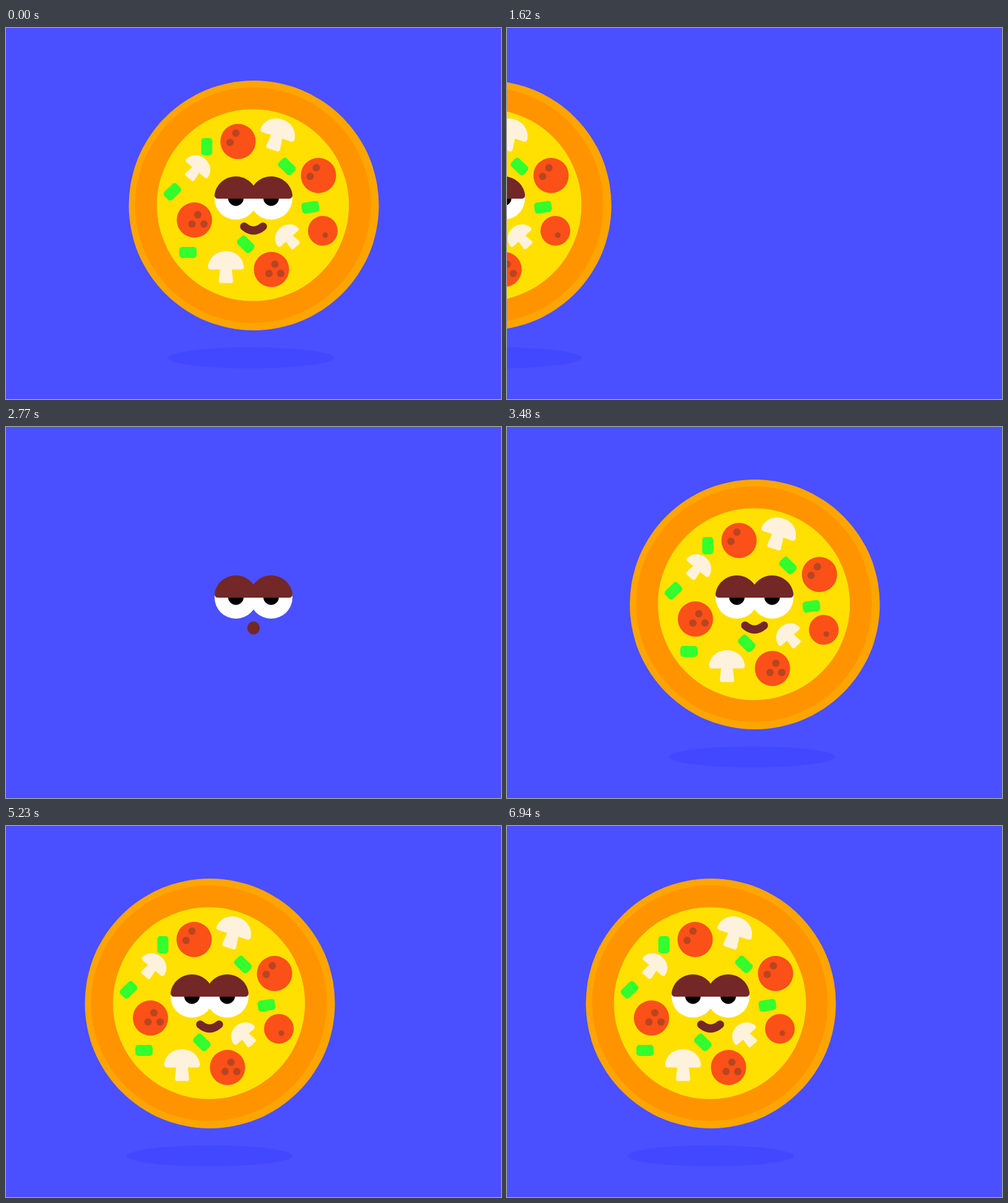
Recreate the animation shown at these times as an HTML page. Size 800 by 600 pixels, loop 6.97 s.

```html
<!DOCTYPE html>
<html lang="en">
<head>
<meta charset="utf-8">
<title>Pizza</title>
<style>
  html, body { margin: 0; width: 100%; height: 100%; overflow: hidden; background: #4a50ff; }
  svg { display: block; width: 800px; height: 600px; }
</style>
</head>
<body>
<svg viewBox="0 0 800 600">
  <defs>
    <clipPath id="cut"></clipPath>
    <clipPath id="disc"><circle cx="400.5" cy="287" r="202"/></clipPath>
    <g id="mushroom">
      <path d="M-24 0Q-29 0-29-5C-27-20-15-29.500 0-29.500S27-20 29-5Q29 0 24 0H9.500L11.500 18Q11.500 22 8 22H-8Q-11.500 22-11.500 18L-9.500 0Z"/>
    </g>
  </defs>
  <ellipse id="shadow" cx="396" cy="533.5" rx="134.500" ry="17" fill="#4248ff"/>
  <g id="pizza">
    <g clip-path="url(#cut)">
      <circle cx="399" cy="286.500" r="160" fill="#ffe000"/>
      <g id="toppings"></g>
    </g>
    <g id="crust" clip-path="url(#disc)"></g>
    <g id="face">
      <g fill="#fff"><circle cx="371.500" cy="275.500" r="34.500"/><circle cx="428.500" cy="275.500" r="34.500"/></g>
      <circle cx="371.500" cy="275.200" r="12.500"/><circle cx="428.500" cy="275.200" r="12.500"/>
      <path fill="#732727" d="M343 276Q337 276 337 270A34.700 34.700 0 0 1 400 255A34.700 34.700 0 0 1 463 270Q463 276 457 276Z"/>
      <path id="smile" d="M384.800 321Q400 334 415.300 321" fill="none" stroke="#732727" stroke-width="13" stroke-linecap="round"/>
      <ellipse id="gasp" cx="400" cy="325" rx="10" ry="10.500" fill="#732727"/>
    </g>
  </g>
  <path id="burst" fill="none" stroke="#fff" stroke-linecap="round"/>
</svg>
<script>
const $ = id => document.getElementById(id);

function add(parent, tag, attrs) {
  const el = document.createElementNS('http://www.w3.org/2000/svg', tag);
  for (const key in attrs) el.setAttribute(key, attrs[key]);
  parent.append(el);
  return el;
}

// Toppings
const toppings = $('toppings');
const pepperoni = [
  [375, 183.5, 28.5, [[-3.5, -13.5], [-13, 1.5]]],
  [505, 238.5, 28.5, [[-3.5, -12.5], [-13.5, 1.5]]],
  [304.5, 310.5, 28.5, [[5.5, -8.5], [-4, 6.5], [15.5, 6.5]]],
  [512, 328, 24, [[4, 7]]],
  [429, 390.5, 28.5, [[5.5, -8.5], [-4, 6.5], [15, 6.5]]]
];
for (const [cx, cy, r, dots] of pepperoni) {
  add(toppings, 'circle', { cx, cy, r, fill: '#fb5018' });
  for (const [dx, dy] of dots)
    add(toppings, 'circle', { cx: cx + dx, cy: cy + dy, r: r > 25 ? 6 : 4.5, fill: '#b94520' });
}

const peppers = [[324.5, 192, 0], [454, 224, -46], [269, 265, 46], [492, 290, 81], [294, 363, 90], [387.5, 350, -45]];
for (const [x, y, turn] of peppers)
  add(toppings, 'rect', {
    x: -9, y: -14, width: 18, height: 28, rx: 5, fill: '#33ff2e',
    transform: `translate(${x} ${y}) rotate(${turn})`
  });

const mushrooms = [[355.5, 390.5, 0, 1], [437.5, 176, 18, 1], [306.5, 229.5, 40, .79], [458, 340.5, -42, .77]];
for (const [x, y, turn, size] of mushrooms)
  add(toppings, 'use', {
    href: '#mushroom', fill: '#fff2dc',
    transform: `translate(${x} ${y}) rotate(${turn}) scale(${size})`
  });

// Slices: each one is a little wider than its 45 degree share
const HALF = 24.6 * Math.PI / 180;
const INNER = 155.3;

// Point on a slice side, pushed outwards by gap, at distance r from the middle
function edge(side, gap, r) {
  const a = HALF + Math.asin(gap / r);
  return [side * r * Math.sin(a), -r * Math.cos(a)];
}

function crustPath(outer) {
  const gap = 11.7, round = 6;
  const arcAngle = HALF + Math.asin(gap / INNER) - round / INNER;
  const inner = side => [side * INNER * Math.sin(arcAngle), -INNER * Math.cos(arcAngle)];
  return `M${edge(-1, gap, outer)}A${outer} ${outer} 0 0 1 ${edge(1, gap, outer)}` +
    `L${edge(1, gap, INNER + round)}Q${edge(1, gap, INNER)} ${inner(1)}` +
    `A${INNER} ${INNER} 0 0 0 ${inner(-1)}` +
    `Q${edge(-1, gap, INNER)} ${edge(-1, gap, INNER + round)}Z`;
}

const GAP = 3.7;
const wedgePath = `M${edge(-1, GAP, 185)}L0-200L${edge(1, GAP, 185)}L1.500 ${GAP / Math.sin(HALF) - 3}H-1.500Z`;

const slices = Array.from({ length: 8 }, (_, i) => {
  const transform = `translate(399 286.5) rotate(${i * 45})`;
  const wedge = add($('cut'), 'path', { d: wedgePath, transform });
  const rind = add($('crust'), 'g', { transform });
  add(rind, 'path', { d: crustPath(215), fill: '#ffa502' });
  add(rind, 'path', { d: crustPath(190.5), fill: '#ff9400' });
  return [wedge, rind];
});

// Timeline: four servings, each ending with the next pizza sliding in
const LOOP = 6970;
const SLIDE = 1590;
const servings = [
  { start: 0, steps: 7, gap: 30 },
  { start: 1770, steps: 5, gap: 30 },
  { start: 3480, steps: 5, gap: 47.5 },
  { start: 5260, steps: 5, gap: 30 }
];
const pops = [[48, 92, 10], [82, 124, 9], [112, 142, 7], [135, 150, 5]];
const RAYS = 12;

function show(el, on) {
  el.style.display = on ? '' : 'none';
}

function drawBurst(step) {
  const pop = pops[step];
  show($('burst'), pop);
  if (!pop) return;
  let d = '';
  for (let i = 0; i < RAYS; i++) {
    const a = i * 2 * Math.PI / RAYS;
    const at = r => `${401 + r * Math.cos(a)} ${273.5 + r * Math.sin(a)}`;
    d += `M${at(pop[0])}L${at(pop[1])}`;
  }
  $('burst').setAttribute('d', d);
  $('burst').setAttribute('stroke-width', pop[2]);
}

function render(time) {
  const serving = servings.filter(s => s.start <= time).pop();
  const t = time - serving.start;
  const sliding = t >= SLIDE;

  let left = 8, shift = 0;
  if (sliding) {
    const step = Math.min(serving.steps, Math.floor((t - SLIDE) / serving.gap + .01) + 1);
    shift = -700 * Math.pow(1 - step / serving.steps, 1.422);
  } else {
    left = Math.max(0, Math.min(8, 9 - Math.floor(t / 100)));
  }

  slices.forEach((parts, i) => parts.forEach(part => show(part, i < left)));
  show($('face'), sliding || t < 1200);
  const gasping = !sliding && t >= 1000;
  show($('smile'), !gasping);
  show($('gasp'), gasping);
  drawBurst(t >= 1200 && t < 1390 ? Math.floor((t - 1200) / 47.5) : -1);

  $('pizza').setAttribute('transform', `translate(${shift} 0)`);
  $('shadow').setAttribute('transform', `translate(${shift * .945} 0)`);
  $('shadow').setAttribute('opacity', left > 2 ? 1 : [0, .3, .65][left]);
}

const begin = performance.now();
function tick() {
  render((performance.now() - begin) % LOOP);
  requestAnimationFrame(tick);
}
tick();
</script>
</body>
</html>
```
